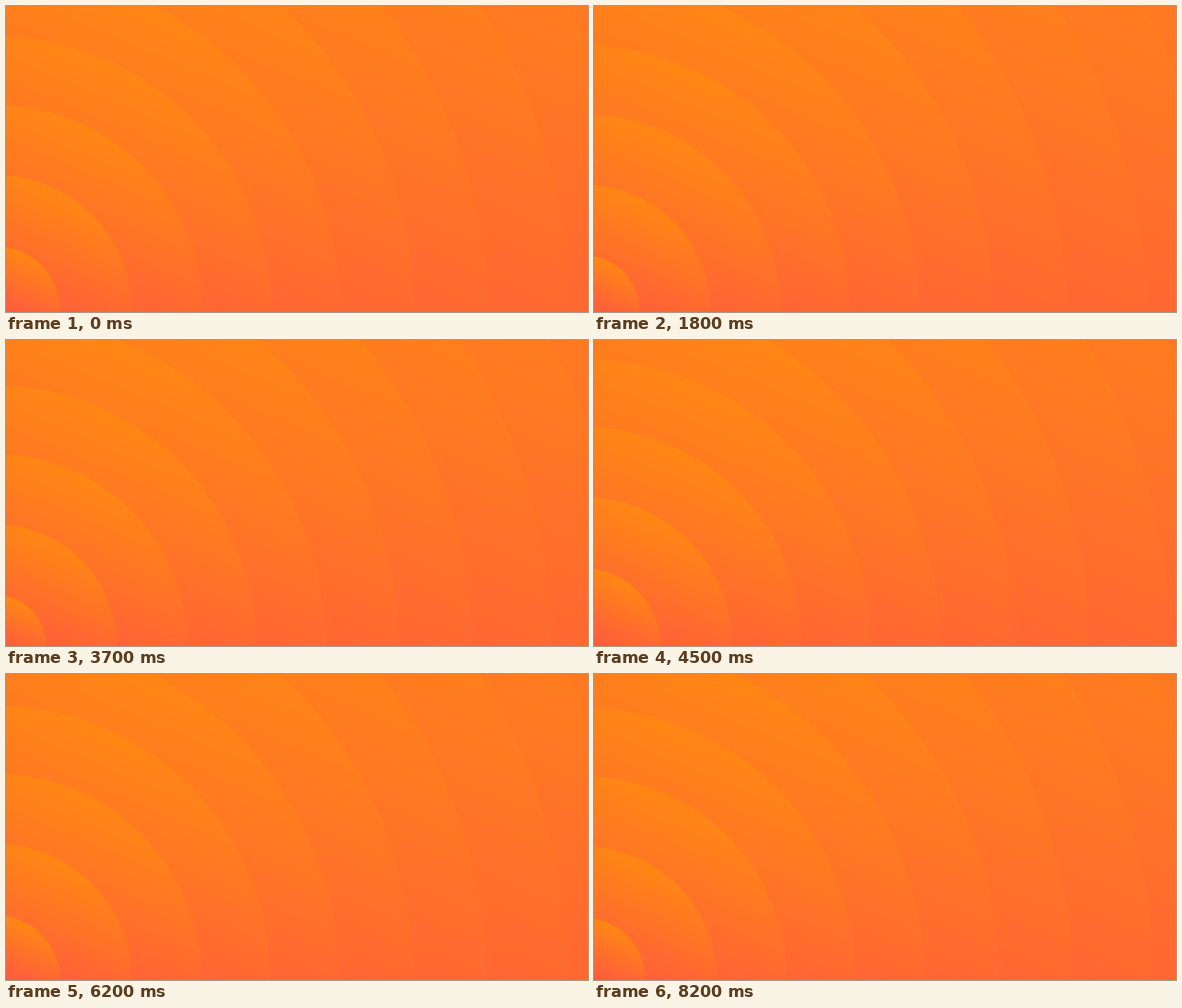
These frames come from a looping animation (714 px wide and 376 px high, 8300 ms). An HTML page:

```html
<!DOCTYPE html>
<html lang="en">
<head>
<meta charset="utf-8">
<title>Orange ripples</title>
<style>
  html, body { margin: 0; width: 100%; height: 100%; overflow: hidden; background: #ff6a34; }
  svg { display: block; width: 100%; height: 100%; }
</style>
</head>
<body>
<svg id="stage" viewBox="0 0 714 376" preserveAspectRatio="none">
  <defs>
    <linearGradient id="glow" x1="0" y1="0" x2="0" y2="1" gradientTransform="rotate(23 .5 .5)">
      <stop offset="0" stop-color="rgb(255,135,20)"/>
      <stop offset=".5" stop-color="rgb(255,87,66)"/>
    </linearGradient>
  </defs>
</svg>
<script>
const LOOP = 8300, STEP = 100, WAVE = LOOP / 4;
const CX = -13, CY = 375.5, COUNT = 11;
// Radius of a ripple at each whole period of its age.
const RADII = [-2, 80, 168, 254, 338, 423, 514, 604, 704, 796, 889, 982];

const stage = document.getElementById('stage');
const rings = Array.from({ length: COUNT }, () => {
  const c = document.createElementNS('http://www.w3.org/2000/svg', 'circle');
  c.setAttribute('cx', CX);
  c.setAttribute('cy', CY);
  c.setAttribute('fill', 'url(#glow)');
  stage.appendChild(c);
  return c;
});

function radius(age) {
  const i = Math.floor(age);
  return Math.max(0, RADII[i] + (RADII[i + 1] - RADII[i]) * (age - i));
}

function draw(ms) {
  const t = Math.floor((ms % LOOP) / STEP) * STEP;
  const phase = (t % WAVE) / WAVE;
  // Largest ripple first, so smaller ones lie on top.
  rings.forEach((c, i) => c.setAttribute('r', radius(COUNT - 1 - i + phase).toFixed(2)));
}

const start = performance.now();
function tick() {
  draw(performance.now() - start);
  requestAnimationFrame(tick);
}
tick();
</script>
</body>
</html>
```
